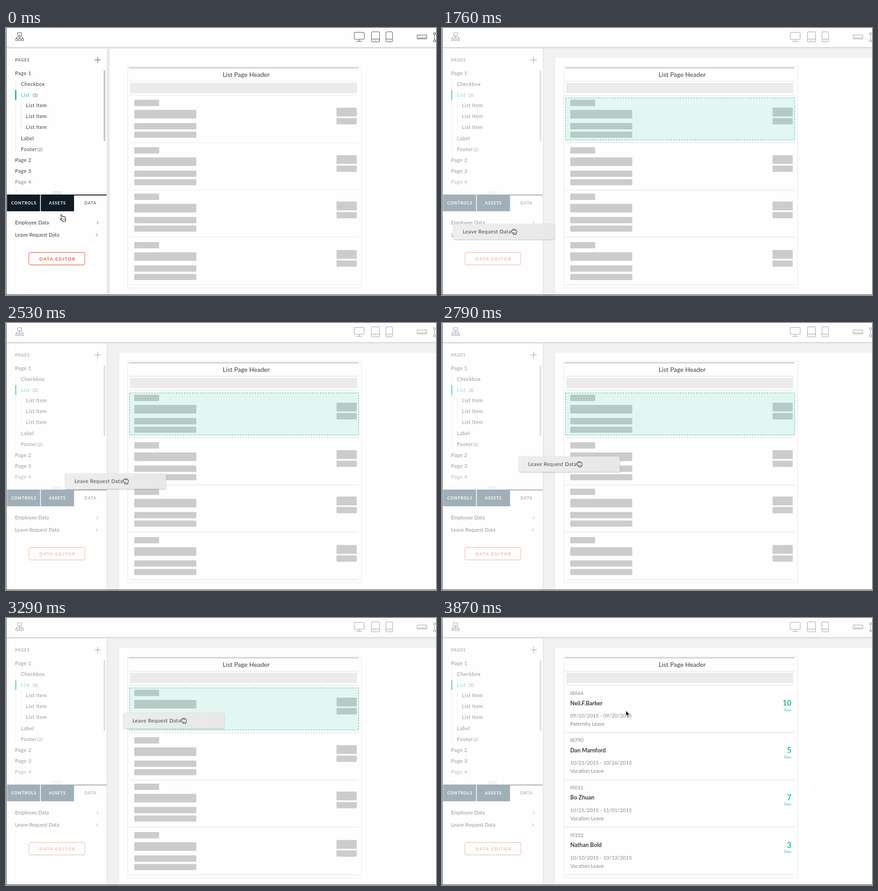
These frames come from a looping animation (949x590 px, 5.37 s). An HTML page:

```html
<!DOCTYPE html>
<html lang="en">
<head>
<meta charset="utf-8">
<title>Data binding demo</title>
<style>
html, body { margin: 0; width: 100%; height: 100%; overflow: hidden; background: #fefefe; }
svg { display: block; width: 949px; height: 590px; font: 11.25px Lato, sans-serif; }
text { fill: #3a4046; white-space: pre; }
.tree text, .chip text { letter-spacing: .45px; }
.tree .n { font-size: 9.7px; letter-spacing: 0; fill: #666; }
.cap { font-size: 9px; letter-spacing: 1px; }
.mid { text-anchor: middle; }
.b { font-weight: 700; }
.line { fill: none; stroke: #4a4f54; }
.row text { fill: #85888b; }
.row .name { font-size: 12.5px; fill: #3a4046; }
.row .num, .row .unit { fill: #1cbd9f; text-anchor: end; }
.row .num { font-size: 16.5px; }
.row .unit { font-size: 7.3px; }
.bar { fill: #ccc; }

.ui, .btn, .tab, .seps, .dim, .hi, .bars, .vals, .point, .drag, .chip, .grab, .arrow {
  animation: 5370ms linear infinite;
}
.ui { animation-name: ui; }
.btn { animation-name: btn; }
.tab { fill: #101b24; animation-name: tab; }
.seps { animation-name: seps; }
.dim { animation-name: dim; }
.hi { animation-name: hi; }
.bars { animation-name: bars; }
.vals { animation-name: vals; }
.point { animation-name: point; }
.drag { animation-name: drag; }
.chip { animation-name: chip; }
.grab { animation-name: grab; }
.arrow { animation-name: arrow; }

@keyframes ui { 0%, 28.305% { opacity: 1 } 32.775%, 100% { opacity: .54 } }
@keyframes btn { 0%, 28.305% { opacity: 1 } 32.775%, 100% { opacity: .42 } }
@keyframes tab { 0%, 28.305% { fill: #101b24 } 32.775%, 100% { fill: #a1afb9 } }
@keyframes seps { 0%, 28.305% { stroke: #e9e9e9 } 32.775%, 100% { stroke: #dcdcdc } }
@keyframes dim { 0%, 28.305% { opacity: 0 } 32.775%, 100% { opacity: 1 } }
@keyframes hi {
  0%, 28.305% { opacity: 0 }
  32.775%, 62.942% { opacity: 1 }
  65.177%, 100% { opacity: 0 }
}
@keyframes bars { 0%, 65.4% { opacity: 1 } 72%, 100% { opacity: 0 } }
@keyframes vals { 0%, 65.4% { opacity: 0 } 72%, 100% { opacity: 1 } }
@keyframes point {
  0%, 23.83% { transform: translate(126px, 420px); opacity: 1 }
  23.836%, 25.512% { transform: translate(126px, 421px) }
  28.3% { transform: translate(133px, 457px); opacity: 1 }
  28.305%, 100% { transform: translate(133px, 457px); opacity: 0 }
}
@keyframes drag {
  0%, 28.305% { transform: translate(0, 440px) }
  32.775%, 34.544% { transform: translate(26px, 433px) }
  42.458% { transform: translate(90px, 372px) }
  44.507% { transform: translate(110px, 353px) }
  51.955% { transform: translate(170px, 295px) }
  54.935% { transform: translate(196px, 271px) }
  61.266% { transform: translate(259px, 210px) }
  62.942%, 100% { transform: translate(276px, 194px) }
}
@keyframes chip {
  0%, 28.305% { opacity: 0 }
  29.795%, 62.942% { opacity: .98 }
  64.06%, 100% { opacity: 0 }
}
@keyframes grab {
  0%, 28.3% { opacity: 0 }
  28.305%, 62.94% { opacity: 1 }
  62.945%, 100% { opacity: 0 }
}
@keyframes arrow { 0%, 62.94% { opacity: 0 } 62.945%, 100% { opacity: 1 } }
</style>
</head>
<body>
<svg viewBox="0 0 949 590">
  <defs>
    <clipPath id="treeClip"><rect x="0" y="46" width="222" height="315"/></clipPath>
    <linearGradient id="chipFill"><stop stop-color="#eee"/><stop offset="1" stop-color="#e8e8e8"/></linearGradient>
  </defs>
  <rect width="949" height="590" fill="#fefefe"/>

  <!-- workspace -->
  <rect x="222" y="46" width="7" height="543" fill="#e9e9e9"/>
  <g class="dim">
    <rect x="222" y="46" width="727" height="543" fill="#f1f1f1"/>
    <rect x="222" y="46" width="3" height="543" fill="#ebebeb"/>
    <rect x="250" y="66" width="699" height="523" fill="#fefefe"/>
  </g>

  <!-- top bar -->
  <rect y="42" width="949" height="2" fill="#d9d9d9"/>
  <rect y="44" width="949" height="2" fill="#ebebeb"/>
  <g class="ui line">
    <path d="M25.5 10.5h9v6h-9zM30 16.5v6M23.5 23v-3h13v3M21.5 23.5h4v4.5h-4zM28 23.5h4v4.5h-4zM34.5 23.5h4v4.5h-4z"/>
    <rect x="768.5" y="9.5" width="22" height="15.5" rx="1.5"/>
    <path d="M779.5 25v4M773 29.5h13"/>
    <rect x="806.5" y="8.5" width="18" height="22" rx="1.5"/>
    <path d="M806.5 24.5h18M814.5 27.5h2"/>
    <rect x="838.5" y="8.5" width="14.5" height="22" rx="1.5"/>
    <path d="M838.5 24.5h14.5M845 27.5h2"/>
    <rect x="907.5" y="15.5" width="21" height="8.5"/>
    <path d="M910.5 24v-3M913.5 24v-5M916.5 24v-3M919.5 24v-5M922.5 24v-3M925.5 24v-5"/>
    <path d="M943.5 10.5h4v4h-4zM943.5 26.5h4v4h-4zM945.5 14.5v12M947.5 12.5h2M947.5 28.5h2"/>
  </g>

  <!-- page tree -->
  <g class="ui">
    <text class="cap" x="20" y="74">PAGES</text>
    <path class="line" d="M195 70.5h14.5M202.5 63.5v14"/>
    <g class="tree" clip-path="url(#treeClip)">
      <path d="M21.5 117v155M33.5 160v64" stroke="#e3e3e3"/>
      <rect x="20" y="137" width="3" height="22" fill="#1cbd9f"/>
      <g id="tree"></g>
    </g>
    <rect x="215.5" y="93" width="3.8" height="157" rx="1.9" fill="#c6c6c6"/>
    <path d="M103 361.5h18.5M103 364h18.5M103 366.5h18.5" stroke="#cfcfcf"/>
  </g>

  <!-- tabs -->
  <rect class="tab" x="2" y="368" width="220" height="2"/>
  <rect class="tab" x="2" y="368" width="73.5" height="37"/>
  <rect class="tab" x="76.7" y="368" width="73.5" height="37"/>
  <rect x="75.5" y="368" width="1.2" height="37" fill="#fefefe"/>
  <g class="cap mid">
    <text class="b" x="39.5" y="390" style="fill:#fff">CONTROLS</text>
    <text class="b" x="113.5" y="390" style="fill:#fff">ASSETS</text>
    <text class="ui" x="186.5" y="390">DATA</text>
  </g>
  <g class="ui">
    <text x="20" y="434">Employee Data</text>
    <text x="20" y="461">Leave Request Data</text>
    <path class="line" d="M200.5 427.5l3 3-3 3M199 454l3 3-3 3"/>
  </g>
  <g class="btn">
    <rect x="50.5" y="496" width="123.5" height="27.5" rx="3.5" fill="none" stroke="#f0754f" stroke-width="1.3"/>
    <text class="b mid" x="113.8" y="513.5" style="fill:#d5603f;font-size:9.5px;letter-spacing:1.7px">DATA EDITOR</text>
  </g>

  <!-- list -->
  <g class="seps" fill="none" stroke="#e9e9e9">
    <rect x="268.5" y="84.5" width="516" height="490" stroke="#e6e6e6"/>
    <path d="M272 117.5h506M272 148.5h506M272 253.5h506M272 358h506M272 462h506M272 567.5h506"/>
  </g>
  <path d="M271 88h507" stroke="#ababab" stroke-width="1.4"/>
  <text class="mid" x="530" y="108" font-size="14">List Page Header</text>
  <rect x="274" y="121" width="501" height="23" fill="#ebebeb"/>
  <g id="bars" class="bars"></g>
  <g id="vals" class="vals"></g>
  <rect class="hi" x="272.5" y="154.5" width="506" height="93" fill="#1abc9c" fill-opacity=".12" stroke="#1cc5a8" stroke-dasharray="3.5 2.5"/>

  <!-- window edge -->
  <path d="M.5 0v590M0 589.5h949" stroke="#343c43"/>

  <!-- pointers -->
  <g class="point">
    <path d="M-5.2-6.3c-.5-1.5 1.3-2 2-.7l2.1 4.1c.4-1 1.6-.9 2 .1.6-.9 1.8-.6 2.1.3.8-.6 1.9-.1 2.1.9l.8 4.1c.2 1.2-.1 2-.5 2.9l.3 1.4-5.8 1.3-.7-1.3c-1.7-.6-3.2-2.1-4.8-3.8-1-1.1.4-2.2 1.6-1.3l1.3.9z" fill="#fff" stroke="#222" stroke-width="1.1" stroke-linejoin="round"/>
    <path d="M.6 1.5l.8 3M2.5 1.2l.7 3M4.3.8l.6 3" fill="none" stroke="#222" stroke-width=".8"/>
  </g>
  <g class="drag">
    <g class="chip">
      <rect width="222" height="34" rx="1" fill="url(#chipFill)" style="filter:drop-shadow(0 1px 1.5px rgba(0,0,0,.28))"/>
      <text x="20" y="21" style="letter-spacing:.5px">Leave Request Data</text>
    </g>
    <g class="grab" transform="translate(0 0)">
      <path d="M128.5 15.2c-.6-1.9.8-2.9 1.8-2.2.2-1.5 2-1.7 2.6-.5.8-1 2.2-.7 2.5.5 1.1-.5 2.1.1 2.2 1.3 1.1-.1 1.5.8 1.4 1.9l-.3 2.6c-.2 1.2-.8 1.8-1.1 2.6v1.5h-6.3l-.2-1.4c-1.6-.9-2.7-2.5-3.7-4.4-.6-1.2.3-2 1.1-1.9z" fill="#fff" stroke="#222" stroke-width="1.1" stroke-linejoin="round"/>
      <path d="M130.6 13.5l.3 2.2M133 13l.1 2.5M135.4 13.4l-.1 2.3M131.6 18v2.5M133.6 18v2.5M135.6 18v2.5" fill="none" stroke="#222" stroke-width=".8"/>
    </g>
  </g>
  <path class="arrow" d="M406 205v11.2l2.6-2.4 1.9 4.4 1.9-.8-1.9-4.3h3.7z" fill="#111" stroke="#fff" stroke-width=".6"/>
</svg>
<script>
const fill = (id, items, draw) => {
  document.getElementById(id).innerHTML = items.map(draw).join('');
};

// label, x, baseline, colour
const pages = [
  ['Page 1', 20, 104], ['Checkbox', 33, 128], ['List', 33, 152, '#1cbd9f'],
  ['List Item', 44, 175], ['List Item', 44, 199], ['List Item', 44, 223],
  ['Label', 33, 248], ['Footer', 33, 272], ['Page 2', 20, 296],
  ['Page 3', 20, 320], ['Page 4', 20, 344, '#7c8084'], ['Page 5', 20, 367, '#dadada']
];
fill('tree', pages, ([s, x, y, c]) =>
  `<text x="${x}" y="${y}"${c ? ` style="fill:${c}"` : ''}>${s}</text>`);
document.getElementById('tree').insertAdjacentHTML('beforeend',
  '<text class="n" x="59" y="152">(3)</text><text class="n" x="69.5" y="272">(2)</text>');

// x, y, width, height
const blocks = [
  [283, 158.5, 55, 14], [283, 181, 137, 19], [283, 210, 137, 14],
  [283, 229, 137, 13.5], [729.5, 176, 44.5, 19.5], [729.5, 199, 44.5, 14]
];
fill('bars', [0, 105, 207.5, 314.5], dy => blocks.map(([x, y, w, h]) =>
  `<rect class="bar" x="${x}" y="${y + dy}" width="${w}" height="${h}" rx="1.5"/>`).join(''));

const rows = [
  [0, 'I8664', 'Neil.F.Barker', '09/10/2015 - 09/20/2015', 'Paternity Leave', 10],
  [104, 'I8790', 'Dan Marnford', '10/21/2015 - 10/26/2015', 'Vacation Leave', 5],
  [208.5, 'I9011', 'Bo Zhuan', '10/25/2015 - 11/01/2015', 'Vacation Leave', 7],
  [313.5, 'I9332', 'Nathan Bold', '10/10/2015 - 10/13/2015', 'Vacation Leave', 3]
];
fill('vals', rows, ([dy, id, name, dates, kind, days]) =>
  `<g class="row" transform="translate(0 ${dy})">
    <text x="283" y="170">${id}</text>
    <text class="name b" x="283" y="192.5">${name}</text>
    <text x="283" y="220" font-size="11.35">${dates}</text>
    <text x="283" y="238">${kind}</text>
    <text class="num b" x="771" y="194.3">${days}</text>
    <text class="unit" x="771" y="205.5">Days</text>
  </g>`);
</script>
</body>
</html>
```
